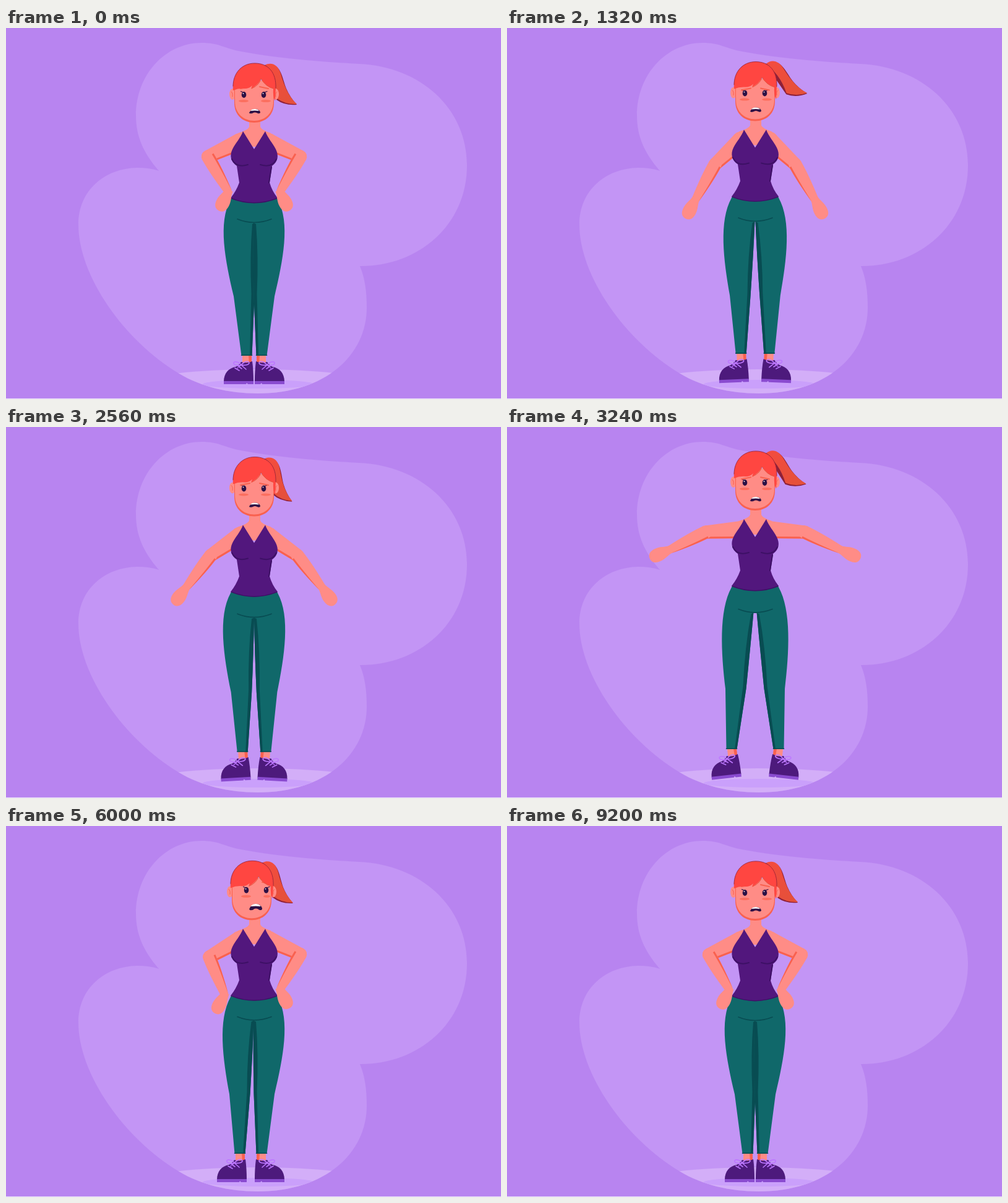
Animation of 800x600 px, one loop 9.24 s. Source, as an HTML page with a canvas:

```html
<!DOCTYPE html>
<html lang="en">
<head>
<meta charset="utf-8">
<title>Jumping jacks</title>
<style>
html, body { margin: 0; width: 100%; height: 100%; overflow: hidden; background: #b884f0; }
canvas { display: block; width: 800px; height: 600px; }
</style>
</head>
<body>
<canvas id="stage"></canvas>
<script>
const LOOP = 9240, RAD = Math.PI / 180;
const C = {
  bg: '#b884f0', blob: '#c395f5', floor: '#d3aef8', shadow: '#caa0fb',
  skin: '#ff8c86', skinShade: '#f9614f', blush: '#fb6f5f',
  hair: '#ff4641', hairShade: '#e5503a', hairEdge: '#8f2038', tie: '#42166f',
  top: '#52177d', topShade: '#3d1065', pants: '#10686a', pantsShade: '#084c52',
  shoe: '#4d1a7c', sole: '#8a4bd0', lace: '#bd78ff', dark: '#2d1145'
};
const canvas = document.getElementById('stage');
const ctx = canvas.getContext('2d');
const dpr = window.devicePixelRatio || 1;
canvas.width = 800 * dpr;
canvas.height = 600 * dpr;

// Smooth interpolation through [time, value] keys without overshoot
function track(keys) {
  const n = keys.length;
  const grad = i => (keys[i + 1][1] - keys[i][1]) / (keys[i + 1][0] - keys[i][0]);
  const slope = keys.map((k, i) => {
    if (i === 0 || i === n - 1) return 0;
    const a = grad(i - 1), b = grad(i);
    return a * b > 0 ? 2 * a * b / (a + b) : 0;
  });
  return t => {
    if (t <= keys[0][0]) return keys[0][1];
    if (t >= keys[n - 1][0]) return keys[n - 1][1];
    let i = 0;
    while (keys[i + 1][0] < t) i++;
    const d = keys[i + 1][0] - keys[i][0], s = (t - keys[i][0]) / d;
    const s2 = s * s, s3 = s2 * s;
    return (2 * s3 - 3 * s2 + 1) * keys[i][1] + (s3 - 2 * s2 + s) * d * slope[i]
      + (3 * s2 - 2 * s3) * keys[i + 1][1] + (s3 - s2) * d * slope[i + 1];
  };
}

// Limb angles: 0 hangs down, 90 points outward, 180 points up
const jack = {
  upper: [[0, 65], [400, 20], [500, 35], [640, 88], [800, 129], [840, 132], [960, 136], [1040, 132], [1240, 86], [1400, 20]],
  fore: [[0, -30], [400, 5], [500, 20], [640, 70], [800, 153], [840, 178], [960, 190], [1040, 180], [1240, 64], [1400, 5]],
  hand: [[0, 27], [400, 8], [500, 20], [640, 70], [800, 185], [840, 205], [960, 212], [1040, 195], [1240, 66], [1400, 8]],
  ankle: [[0, 389], [480, 389], [640, 370], [780, 348], [1060, 348], [1240, 363], [1400, 389]],
  knee: [[0, 385], [400, 382], [500, 384], [640, 372], [800, 355], [840, 346], [960, 342], [1060, 352], [1240, 370], [1400, 382]]
};
const left = {
  upper: track([...jack.upper, [1700, 60], [2000, 90], [2250, 119], [2440, 120], [2750, 118], [3000, 95], [3200, 70], [3500, 60], [4600, 60], [7240, 65]]),
  fore: track([...jack.fore, [1700, -30], [2000, -90], [2250, -137], [2440, -138], [2750, -142], [2900, -200], [3000, -275], [3200, -340], [3500, -382], [4600, -382], [7240, -390]]),
  hand: track([...jack.hand, [1700, 10], [2000, -90], [2250, -137], [2440, -138], [2750, -142], [2900, -200], [3000, -275], [3200, -320], [3500, -332], [7240, -333]]),
  ankle: track([...jack.ankle, [1550, 389], [1800, 378], [6500, 378], [7000, 389]]),
  knee: track([...jack.knee, [1550, 385], [1800, 378], [6500, 378], [7000, 385]])
};
const right = {
  upper: track([...jack.upper, [1700, 65]]),
  fore: track([...jack.fore, [1700, -30]]),
  hand: track([...jack.hand, [1700, 27]]),
  ankle: track(jack.ankle),
  knee: track([...jack.knee, [1600, 385]])
};
const bodyY = track([[0, 0], [250, 6], [400, 9], [500, 2], [640, -20], [760, 1], [800, 7], [840, 9], [920, 10], [1020, 3], [1200, -21], [1240, -18], [1400, 9], [1550, 4], [1800, 0]]);
const footLift = track([[0, 0], [490, 0], [640, 10], [780, 0], [1070, 0], [1210, 10], [1240, 9], [1390, 0]]);
const tailTurn = track([[0, 0], [400, 4], [520, 8], [640, 0], [740, -13], [800, -9], [840, 7], [920, 10], [1060, 6], [1180, -4], [1240, -14], [1320, -16], [1400, 4], [1600, 6], [1800, 0], [2440, -1], [3000, -5], [4000, 2], [5000, 0]]);
const headTilt = track([[1800, 0], [2200, -8], [2700, -8], [3100, 0]]);
const headX = track([[1700, 0], [2200, -4], [4000, -4], [4600, 0]]);
const gaze = track([[3300, 0], [3700, 8], [4300, 8], [4700, 0]]);

function fill(color, d) {
  ctx.fillStyle = color;
  ctx.fill(typeof d === 'string' ? new Path2D(d) : d);
}
function stroke(color, width, d) {
  ctx.strokeStyle = color;
  ctx.lineWidth = width;
  ctx.stroke(new Path2D(d));
}
function oval(color, x, y, rx, ry) {
  ctx.fillStyle = color;
  ctx.beginPath();
  ctx.ellipse(x, y, rx, ry, 0, 0, 7);
  ctx.fill();
}
function group(draw) {
  ctx.save();
  draw();
  ctx.restore();
}
function mirror() {
  ctx.translate(802, 0);
  ctx.scale(-1, 1);
}

const blob = new Path2D('M247 231C222 202 210 175 210 142C210 75 258 24 316 24C345 24 352 33 380 38C450 51 520 55 570 58C670 62 745 130 745 222C745 320 665 386 572 385C580 405 583 425 583 452C583 530 515 591 407 591C360 591 315 580 280 559C190 505 117 400 117 318C117 262 160 227 212 226Q232 226 247 231Z');

function drawScene() {
  ctx.fillStyle = C.bg;
  ctx.fillRect(0, 0, 800, 600);
  fill(C.blob, blob);
  group(() => {
    ctx.clip(blob);
    oval(C.floor, 405, 574, 182, 22);
    oval(C.shadow, 408, 576, 90, 7);
  });
  ctx.fillStyle = '#eadcfb';
  ctx.fillRect(0, 599, 800, 1);
}

function drawShoe() {
  fill(C.skin, 'M-7 -2H8V15H-7Z');
  fill(C.skinShade, 'M3 -2H8V15H4Z');
  fill(C.shoe, 'M-37 42C-37 28 -29 20 -18 18Q-12 15 -9 10Q0 13 9 9Q11 24 11 42Z');
  fill(C.sole, 'M-37 41H11V46H2L0 44L-1 46H-37Z');
  stroke(C.lace, 1.6, 'M-19 20L-12 24M-15 16L-8 21M-9 15C-14 8 -23 9 -21 13C-19 16 -13 16 -9 15C-3 8 4 8 4 12C3 15 -4 16 -9 15L-15 20M-9 15L-1 22');
}

function drawLeg(side, t, b) {
  const ax = side.ankle(t), kx = side.knee(t), lift = footLift(t);
  const ay = 530 - lift, ky = 434 + Math.min(0, b) * 0.6;
  const out = kx - 17, inn = kx + 16.5;
  const cx = 402 - (389 - ax) * 0.14, cy = 315 + b * 0.8;
  const bend = out + (337 - out) * 0.44;
  group(() => {
    ctx.translate(ax, ay);
    ctx.rotate(-lift * 0.012);
    drawShoe();
  });
  const innerEdge = `${cx} ${cy}Q${(cx + inn) / 2 + 1} ${cy + 55} ${inn} ${ky}L${ax + 8.5} ${ay}`;
  fill(C.pants, `M402 ${270 + b}L367 ${270 + b}L363 ${277 + b}C342 ${315 + b} ${bend} ${ky - 58} ${out} ${ky}L${ax - 8.5} ${ay}H${ax + 8.5}L${inn} ${ky}Q${(cx + inn) / 2 + 1} ${cy + 55} ${cx} ${cy}L402 ${cy}Z`);
  fill(C.pantsShade, `M${innerEdge}H${ax + 5}L${inn - 5} ${ky - 4}Q${(cx + inn) / 2 - 8} ${cy + 55} ${cx - 4} ${cy + 2}Z`);
  stroke(C.pantsShade, 1.6, `M${ax - 8.5} ${ay - 0.8}H${ax + 8.5}`);
}

function toElbow(side, t, b) {
  ctx.translate(378, 184 + b);
  ctx.rotate(side.upper(t) * RAD);
}
function drawUpperArm(side, t, b) {
  toElbow(side, t, b);
  oval(C.skin, 0, 0, 14, 14);
  oval(C.skin, 0, 57, 10.5, 10.5);
  fill(C.skin, 'M-14 0L-10.5 57H10.5L14 0Z');
  fill(C.skinShade, 'M14 0L10.5 57L7.5 57L11 0Z');
}
function drawForearm(side, t, b) {
  const fore = side.fore(t);
  toElbow(side, t, b);
  ctx.translate(0, 57);
  ctx.rotate((fore - side.upper(t)) * RAD);
  oval(C.skin, 0, 0, 10.5, 10.5);
  fill(C.skin, 'M-10.5 0Q-11 25 -6 67H6Q11 25 10.5 0Z');
  fill(C.skinShade, 'M10.5 0Q11 25 6 67Q8 25 7.5 0Z');
  ctx.translate(0, 66);
  ctx.rotate((side.hand(t) - fore) * RAD);
  fill(C.skin, 'M-6 -4C-7 6 -11 10 -11 20C-11 30 -6 34 0 34C7 34 11 29 11 20C11 10 7 6 6 -4Z');
  if (fore > 115) stroke(C.skin, 5, 'M-2 9L-11 7');
}

function drawTorso() {
  fill(C.skin, 'M393 138H411V160Q413 165 428 170L434 192H368L375 170Q391 165 393 160Z');
  fill(C.top, 'M383 167C379 178 371 186 366 196C361 206 363 216 373 223L377 250Q372 264 363 275Q401 291 439 275Q430 264 426 250L430 223C440 216 441 206 436 196C431 186 423 178 419 167L401 196Z');
  stroke(C.topShade, 2, 'M365 212Q372 227 391 221M411 221Q430 227 437 212M429 225L425 250');
  stroke(C.topShade, 1.4, 'M364 275.5Q401 290 438 275.5');
}

function drawMouth(t, size) {
  ctx.translate(402, 135);
  if (t > 420 && t < 1000) {
    fill('#fff', 'M-9 0Q-6 -4 4 -3.500Q10 -3 9 1L8 5Q0 2 -8 4Z');
    stroke('#d9cbd5', 0.7, 'M-8 1Q0 -1 8 1');
  } else if (t > 3900 && t < 5000) {
    ctx.rotate(8 * RAD);
    stroke(C.dark, 1.7, 'M-6 4Q-1 -2 6 0');
  } else {
    ctx.scale(1 + (size - 1) * 0.4, size);
    fill(C.dark, 'M-9 2Q-6 -4 0 -4Q7 -4 9 1Q9 4 5 3Q0 0 -4 3Q-9 4 -9 2Z');
    fill('#fff', 'M-7 -1Q-5 -4 0 -4Q5 -4 7 -1Q0 -2 -7 -1Z');
  }
}

function drawHead(t, tj, b) {
  const look = gaze(tj), tilt = headTilt(tj);
  const browDrop = track([[0, 0], [500, 5], [3600, 4], [5300, 0]])(t);
  ctx.translate(402 + headX(tj), 158 + b);
  ctx.rotate(tilt * RAD);
  ctx.translate(-402, -158);

  group(() => {
    ctx.translate(422, 62);
    ctx.rotate(tailTurn(tj) * RAD);
    const g = ctx.createLinearGradient(0, 0, 40, 55);
    g.addColorStop(0, '#f34c3e');
    g.addColorStop(1, C.hairShade);
    fill(C.hairEdge, 'M-3 0C22 -9 23 15 31 36Q37 50 48 62Q29 64 15 54Z');
    fill(g, 'M-4 -2C8 -8 18 -2 22 12C28 33 35 49 48 61Q30 62 16 52Q14 18 -4 -2Z');
  });
  stroke(C.tie, 4, 'M418 62L424 67');
  oval(C.skin, 366, 107, 5, 9);
  oval(C.skin, 436, 107, 5, 9);
  stroke(C.skinShade, 1, 'M364 103Q367 105 366 111M438 103Q435 105 436 111');
  fill(C.skinShade, 'M369 85V121C369 141 383 153 401 153C419 153 433 141 433 121V85Z');
  fill(C.skin, 'M370 85V119C370 138 384 150 401 150C418 150 432 138 432 119V85Z');

  group(() => {
    ctx.translate(look, look * -0.45);
    oval(C.blush, 384, 118, 8, 2);
    oval(C.blush, 420 - look * 0.3, 118, 8 - look * 0.3, 2);
    for (const x of [384.5, 416.5]) {
      oval(C.dark, x, 108, 3.8, 5);
      oval('#fff', x - 1, 106, 0.8, 0.9);
    }
    stroke(C.dark, 1.2, 'M383 104L379.500 102.500M418 104L422 102.500');
    stroke(C.skinShade, 2, `M379 ${98 + browDrop}L394 ${95 + browDrop}M410 ${95 + browDrop}L424 ${98 + browDrop}`);
    ctx.translate(-look * 0.3, look * 0.1);
    drawMouth(t, 1 + look / 20);
  });

  fill(C.hair, 'M367 101C365 73 381 57 402 57C424 57 437 72 436 95L435 118Q431 110 432 98Q420 95 412 82Q408 92 396 98L398 93Q393 98 386 98Q376 97 367 101Z');
  stroke(C.hairEdge, 0.8, 'M367 94C367 73 381 57 402 57C424 57 437 72 436 97');
  stroke(C.hairShade, 1, 'M412 82Q410 92 397 98M412 82Q420 95 432 98');
}

function drawFigure(t) {
  // Three jacks share one 1000 ms cycle; everything later follows on directly
  const tj = t < 1400 ? t : t < 3400 ? (t - 400) % 1000 + 400 : t - 2000;
  const breath = t > 3800 ? 0.75 * (1 - Math.cos((t - 3800) / 680 * 2 * Math.PI)) : 0;
  const b = bodyY(tj) - breath;
  const both = draw => {
    group(() => draw(left, tj, b));
    group(() => { mirror(); draw(right, tj, b); });
  };
  both(drawLeg);
  stroke(C.pantsShade, 1.6, `M374 ${309 + b * 0.8}Q401 ${320 + b * 0.8} 429 ${309 + b * 0.8}`);
  both(drawUpperArm);
  group(() => { ctx.translate(0, b); drawTorso(); });
  both(drawForearm);
  group(() => drawHead(t, tj, b));
}

function frame(now) {
  ctx.setTransform(dpr, 0, 0, dpr, 0, 0);
  ctx.lineCap = ctx.lineJoin = 'round';
  drawScene();
  drawFigure(Math.floor(now % LOOP / 40) * 40);
  requestAnimationFrame(frame);
}
frame(performance.now());
</script>
</body>
</html>
```
